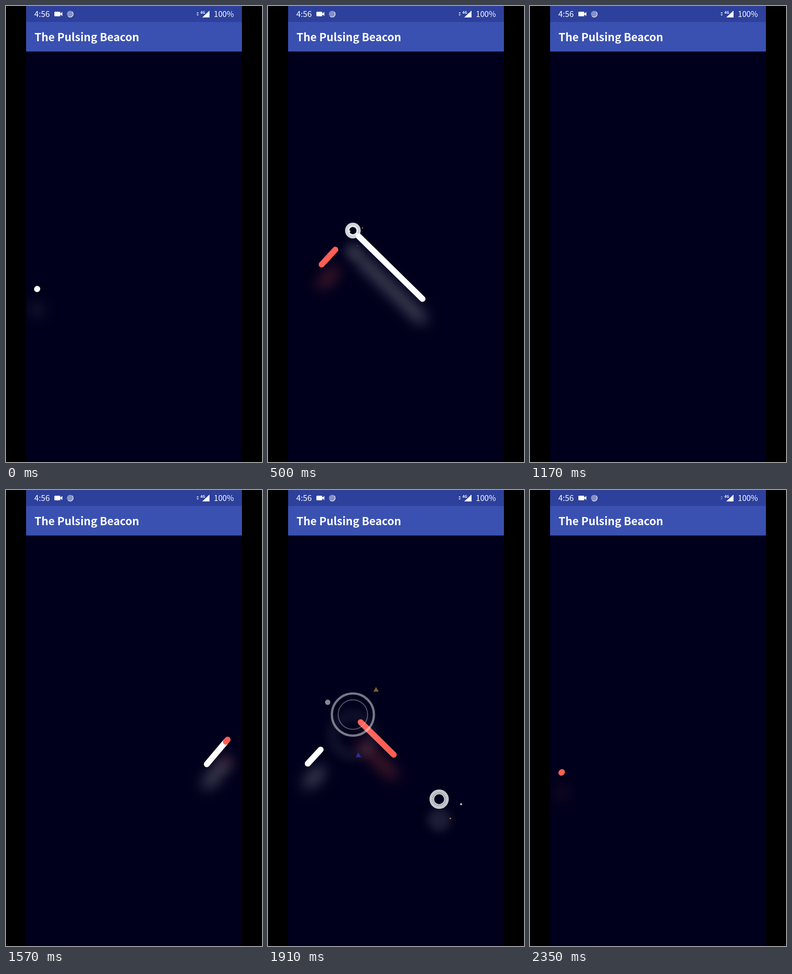
Recreate the animation shown at these times as an HTML page with a canvas. Size 561 by 997 pixels, loop 2.41 s.

```html
<!DOCTYPE html>
<html lang="en">
<head>
<meta charset="utf-8">
<title>Loader</title>
<style>
  html, body { margin: 0; width: 100%; height: 100%; overflow: hidden; background: #000; }
  canvas { display: block; }
</style>
</head>
<body>
<canvas id="stage" width="561" height="997"></canvas>
<script>
const ctx = document.getElementById('stage').getContext('2d');
const LOOP = 2410, RETURN_AT = 1235, TAU = Math.PI * 2;
const LEFT = 44, WIDTH = 473;
const FONT = '"Noto Sans CJK SC", "Noto Sans CJK JP", "Noto Sans", sans-serif';
const WHITE = '255,255,255', RED = '255,94,84', AMBER = '240,180,70', BLUE = '60,80,235';

const clamp = (v, lo = 0, hi = 1) => Math.min(hi, Math.max(lo, v));
const mix = (a, b, k) => a + (b - a) * k;
const smooth = x => x * x * (3 - 2 * x);
const logistic = x => 1 / (1 + Math.exp(-x));

const PATH = [[68, 619], [186, 491], [375, 676], [493, 537]];
const LENGTHS = PATH.slice(1).map((p, i) => Math.hypot(p[0] - PATH[i][0], p[1] - PATH[i][1]));
const TOTAL = LENGTHS.reduce((a, b) => a + b);

// Each end crosses the path on an S-curve: halfway at `mid`, `pace` sets how gently.
const STREAKS = [
  { color: WHITE, from: 0, to: 960, head: { mid: 466, pace: 69 }, tail: { mid: 550, pace: 61 } },
  { color: RED, from: 300, to: 1140, head: { mid: 616, pace: 79 }, tail: { mid: 670, pace: 84 } }
];

const BURST_TIME = 572;
const BURSTS = [
  { at: PATH[1], start: 346, bits: [
    { from: [13, 13], to: [-98, -52], color: WHITE },
    { from: [9, 14], to: [77, -96], color: AMBER, turn: -50, spin: 137 },
    { from: [9, 10], to: [14, 140], color: BLUE, turn: -50, spin: 137 }] },
  { at: PATH[2], start: 496, bits: [
    { from: [24, 11], to: [127, 11], color: WHITE },
    { from: [9, 22], to: [75, 108], color: AMBER, turn: -132, spin: 400 }] }
];

function pointAt(d) {
  let i = 0;
  while (i < LENGTHS.length - 1 && d > LENGTHS[i]) d -= LENGTHS[i++];
  const k = d / LENGTHS[i];
  return [mix(PATH[i][0], PATH[i + 1][0], k), mix(PATH[i][1], PATH[i + 1][1], k)];
}

function glow(color, alpha, blur) {
  ctx.shadowColor = `rgba(${color},${alpha})`;
  ctx.shadowBlur = blur;
  ctx.shadowOffsetY = 45;
}

function drawStreak({ color, from, to, head, tail }, u, reverse) {
  if (u < from || u >= to) return;
  const reach = end => TOTAL * logistic((u - end.mid) / end.pace);
  let a = reach(tail), b = reach(head);
  if (reverse) [a, b] = [TOTAL - b, TOTAL - a];
  if (a > b) [a, b] = [b, a];
  ctx.save();
  glow(color, .53, 32);
  ctx.strokeStyle = `rgb(${color})`;
  ctx.lineWidth = 13;
  ctx.lineCap = ctx.lineJoin = 'round';
  ctx.beginPath();
  ctx.moveTo(...pointAt(a));
  let d = 0;
  LENGTHS.forEach((length, i) => {
    d += length;
    if (d > a && d < b) ctx.lineTo(...PATH[i + 1]);
  });
  const end = pointAt(b);
  ctx.lineTo(end[0] + .01, end[1]);
  ctx.stroke();
  ctx.restore();
}

function strokeRing(r, width, alpha) {
  if (width <= 0 || alpha <= 0) return;
  ctx.strokeStyle = `rgba(245,250,250,${clamp(alpha)})`;
  ctx.lineWidth = width;
  ctx.beginPath();
  ctx.arc(0, 0, r, 0, TAU);
  ctx.stroke();
}

function drawBit({ from, to, color, turn, spin }, x) {
  const k = smooth(x);
  ctx.save();
  ctx.translate(mix(from[0], to[0], k), mix(from[1], to[1], k));
  ctx.fillStyle = `rgba(${color},${clamp(Math.min(1.05 - .9 * x, 3 - 3 * x))})`;
  ctx.beginPath();
  if (spin) {
    ctx.rotate((turn + spin * x) * TAU / 360);
    for (let i = 0; i < 3; i++) {
      ctx.lineTo(11 * k * Math.cos(i * TAU / 3), 11 * k * Math.sin(i * TAU / 3));
    }
  } else {
    ctx.arc(0, 0, 9.5 * k, 0, TAU);
  }
  ctx.fill();
  ctx.restore();
}

function drawBurst({ at, start, bits }, u) {
  const x = (u - start) / BURST_TIME;
  if (x < .15 || x >= 1) return;
  const r = 75 * smooth(x);
  ctx.save();
  ctx.translate(...at);
  ctx.save();
  glow(WHITE, x, 22);
  strokeRing(r, 8 * (1 - (x / .92) ** 2), 1.17 - 1.2 * x);
  strokeRing(r * .7, 4.5 * (1 - x), 1.35 - 1.7 * x);
  ctx.restore();
  bits.forEach(bit => drawBit(bit, x));
  ctx.restore();
}

function fillPoly(...points) {
  ctx.beginPath();
  points.forEach(p => ctx.lineTo(...p));
  ctx.fill();
}

function label(text, x, y, font) {
  ctx.font = `${font} ${FONT}`;
  ctx.fillText(text, x, y);
}

function drawBars(t) {
  ctx.fillStyle = '#2d409b';
  ctx.fillRect(LEFT, 0, WIDTH, 35);
  ctx.fillStyle = '#3a51b1';
  ctx.fillRect(LEFT, 35, WIDTH, 64.5);

  ctx.fillStyle = '#fff';
  label('The Pulsing Beacon', 62.5, 76.5, 'bold 24px');
  label('4:56', 62, 24, '17.5px');
  label('100%', 455.5, 24, '17px');
  label('4G', 426, 17, 'bold 8px');

  ctx.beginPath();
  ctx.roundRect(106, 12.5, 13, 10, 1.5);
  ctx.fill();
  fillPoly([118, 17.5], [123.5, 13], [123.5, 22]);
  fillPoly([430, 25], [446, 25], [446, 10]);

  ctx.globalAlpha = t >= 2000 ? .45 : 1;
  fillPoly([417.5, 16], [420, 13.5], [422.5, 16]);
  fillPoly([417.5, 18.5], [420, 21], [422.5, 18.5]);
  ctx.globalAlpha = 1;

  ctx.fillStyle = '#8590c8';
  ctx.beginPath();
  ctx.arc(140.5, 17.5, 7, 0, TAU);
  ctx.fill();
  ctx.strokeStyle = '#d5d9ee';
  ctx.lineWidth = 1.6;
  ctx.beginPath();
  ctx.arc(140.5, 17.5, 6.7, -.9, 2.3);
  ctx.stroke();
}

function draw(t) {
  const reverse = t >= RETURN_AT;
  const u = reverse ? t - RETURN_AT : t;
  ctx.fillStyle = '#000';
  ctx.fillRect(0, 0, 561, 997);
  ctx.save();
  ctx.beginPath();
  ctx.rect(LEFT, 0, WIDTH, 997);
  ctx.clip();
  ctx.fillStyle = '#00001c';
  ctx.fillRect(LEFT, 0, WIDTH, 997);
  STREAKS.forEach(streak => drawStreak(streak, u, reverse));
  BURSTS.forEach(burst => drawBurst(burst, u));
  ctx.restore();
  drawBars(t);
}

const began = performance.now();
function loop() {
  draw((performance.now() - began) % LOOP);
  requestAnimationFrame(loop);
}
loop();
</script>
</body>
</html>
```
